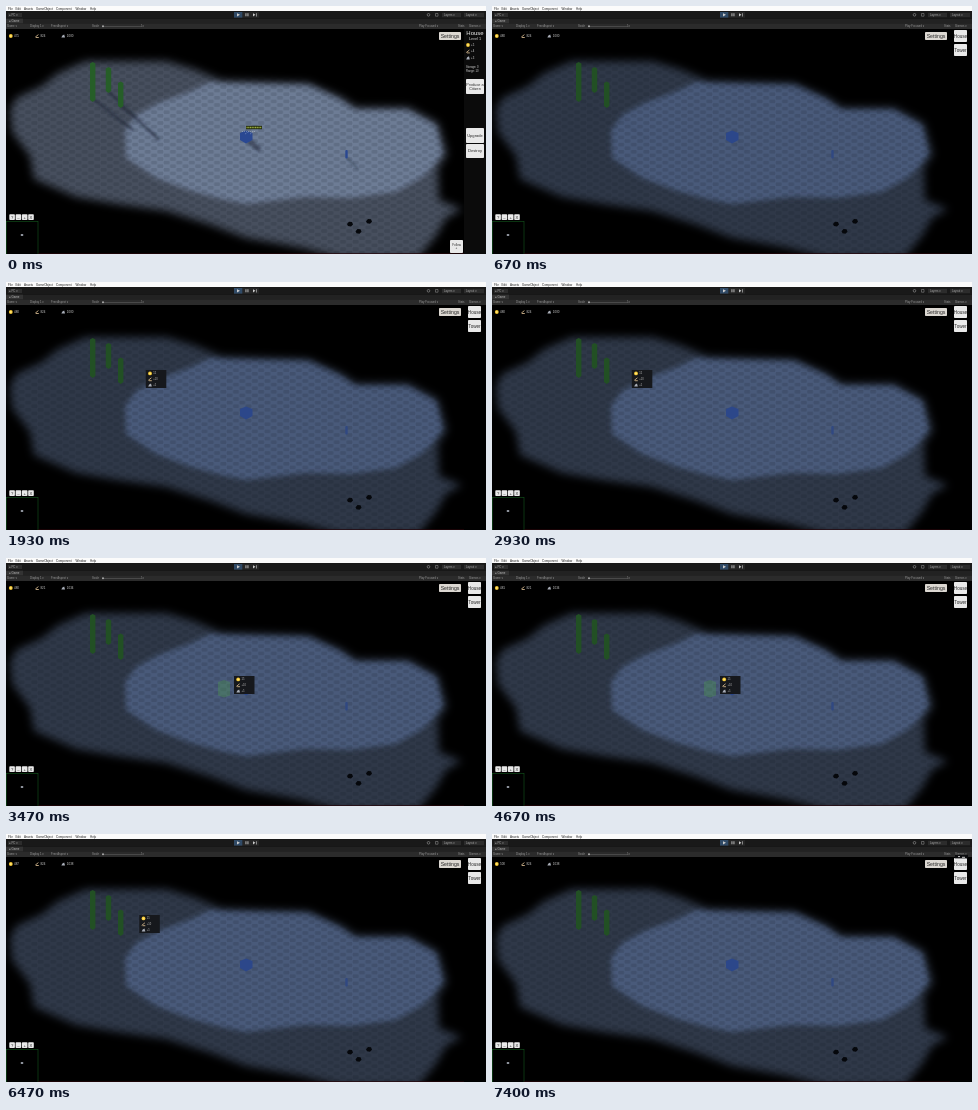
Recreate the animation shown at these times as an HTML page. Size 480x248 px, loop 7540 ms.

```html
<!DOCTYPE html>
<html lang="en">
<head>
<meta charset="utf-8">
<title>Strategy game</title>
<style>
  html, body { margin: 0; width: 100%; height: 100%; overflow: hidden; background: #000; }
  svg { display: block; width: 100vw; height: 100vh; font-family: "Liberation Sans", Arial, sans-serif; }
</style>
</head>
<body>
<svg id="stage" viewBox="0 0 480 248">
  <defs>
    <pattern id="tiles" width="12.6" height="7.2" patternUnits="userSpaceOnUse">
      <path d="M.6 0H5.7L6.3 1.8L5.7 3.6H.6L0 1.8ZM6.9 3.6H12L12.6 5.4L12 7.2H6.9L6.3 5.4Z" fill="#0a1018" opacity=".13"/>
    </pattern>
    <filter id="fog" x="-10%" y="-10%" width="120%" height="120%"><feGaussianBlur stdDeviation="4"/></filter>
    <filter id="edge"><feGaussianBlur stdDeviation="2.4"/></filter>
    <filter id="soft" x="-50%" y="-50%" width="200%" height="200%"><feGaussianBlur stdDeviation=".8"/></filter>
    <mask id="seen" maskUnits="userSpaceOnUse" x="0" y="23" width="480" height="225">
      <path filter="url(#fog)" fill="#fff" d="M80 55H160L188 63L215 74L302 77L335 91L350 101H402L432 117L441 148L432 162L433 194L456 203L440 212L430 230L412 252H335L296 242L240 232L205 219L160 205L110 198L70 191L28 173L24 150L6 126L4 104L10 92L36 80L52 67Z"/>
    </mask>
  </defs>

  <rect width="480" height="248"/>
  <g mask="url(#seen)">
    <rect id="far" y="23" width="480" height="225"/>
    <path id="near" filter="url(#edge)" d="M119 124L130 109L152 97L185 85L206 75L255 76L305 76L335 91L350 102H402L432 118L438 148L428 160L415 172L390 186L345 192L300 191L240 198L215 193L185 185L150 172L120 152Z"/>
    <rect y="23" width="480" height="225" fill="url(#tiles)"/>
  </g>

  <g id="shadows" filter="url(#soft)" stroke="#1b2434" fill="none">
    <path d="M87 93L127 124M103 86L153 134M115 100L150 130" stroke-width="2.8"/>
    <path d="M242 134L254 144" stroke-width="5"/>
    <path d="M341 152L352 163" stroke-width="1.4"/>
  </g>
  <g id="pillars"></g>
  <path id="house" d="M234 127L240 124.5L246.5 127V134L240 137.5L234 134Z"/>
  <rect id="unit" x="339.3" y="144" width="2.4" height="8.5" rx="1"/>
  <g id="rocks" fill="#05070b"></g>
  <g id="label">
    <rect x="240" y="119.8" width="16" height="3.4" fill="#20280c"/>
    <path d="M240.5 121.5H255.5" stroke="#9cb040" stroke-width="1.3" stroke-dasharray="1.2 .5"/>
    <path d="M236 125.5H250M239 128L244 125M244 128L249 125" stroke="#c5cfdf" stroke-width=".4" stroke-dasharray="1 1"/>
  </g>

  <path id="ghost" d="M0 2L6 0L12 2V15.5L6 17.5L0 15.5Z" fill="#4c9254" opacity=".42"/>

  <g id="hud"></g>
  <g id="panel"></g>
  <g id="build"></g>
  <g id="tip"></g>
  <g id="editor"></g>
  <g id="pointer">
    <rect x="463" y="20.8" width="13" height="3.6" fill="#0b0c0e"/>
    <path d="M466 22.6H468M470 23.3H473" stroke="#ddd" stroke-width=".9"/>
  </g>
</svg>
<script>
const LOOP = 7540, STEP = 1000 / 15;
const $ = id => document.getElementById(id);
const clamp = v => Math.max(0, Math.min(1, v));
const span = (t, a, b) => clamp((t - a) / (b - a));
const ease = p => p * p * (3 - 2 * p);
const mix = (a, b, p) => `rgb(${a.map((v, i) => Math.round(v + (b[i] - v) * p))})`;
const show = (id, on) => $(id).setAttribute('visibility', on ? 'visible' : 'hidden');
const add = (id, html) => $(id).insertAdjacentHTML('beforeend', html);

const rect = (x, y, w, h, fill, extra = '') =>
  `<rect x="${x}" y="${y}" width="${w}" height="${h}" fill="${fill}" ${extra}/>`;
const text = (x, y, s, size = 3, fill = '#ddd', extra = '') =>
  `<text x="${x}" y="${y}" font-size="${size}" fill="${fill}" ${extra}>${s}</text>`;
const mid = 'text-anchor="middle"';
const button = (x, y, w, h, lines, size, fill = '#e9e9e9') =>
  rect(x, y, w, h, fill, 'rx=".8"') + lines.map((s, i) =>
    text(x + w / 2, y + h / 2 + size * (.35 + i - (lines.length - 1) / 2), s, size, '#282828', mid)).join('');

const coin = (x, y) => `<circle cx="${x}" cy="${y}" r="1.9" fill="#f3c52f"/><circle cx="${x}" cy="${y}" r="1" fill="#ffe57a"/>`;
const wood = (x, y) => `<path d="M${x - 1.8} ${y + 1.2}L${x + 1.4} ${y - 1.4}M${x - 1} ${y + 1.5}H${x + 1.8}" stroke="#b9a07c" stroke-width="1"/>`;
const stone = (x, y) => `<path d="M${x - 1.8} ${y + 1.6}L${x - .8} ${y - .5}L${x + 1} ${y - 1.5}L${x + 1.8} ${y + 1.6}Z" fill="#a9aeb8"/>`;
const icons = [coin, wood, stone];

function buildEditor() {
  let s = rect(0, 0, 480, 5, '#fbfbfb') + rect(0, 5, 480, 7.5, '#191919') +
    rect(0, 12.5, 480, 5, '#222') + rect(0, 17.3, 480, 5.7, '#2b2b2b') + rect(0, 12.7, 17, 4.6, '#333');
  [[2, 'File'], [9.5, 'Edit'], [18, 'Assets'], [30, 'GameObject'], [50, 'Component'], [69.5, 'Window'], [84, 'Help']]
    .forEach(([x, w]) => s += text(x, 3.6, w, 3, '#222'));
  s += rect(2, 7, 14, 4, '#2c2c2c') + text(3, 10, '&#9679; PC &#9662;', 2.8, '#aaa');
  s += rect(228, 6, 25, 5.6, '#262626') + rect(228, 6, 8.3, 5.6, '#304a66');
  s += '<path d="M231 7.2L234 8.8L231 10.4ZM239.5 7.3H240.4V10.3H239.5ZM241.5 7.3H242.4V10.3H241.5ZM247 7.2L249.4 8.8L247 10.4ZM250 7.2H250.6V10.4H250Z" fill="#ccc"/>';
  s += '<circle cx="422.5" cy="8.8" r="1.3" fill="none" stroke="#999" stroke-width=".6"/><path d="M429.5 7.5H432V10.2H429.5Z" fill="none" stroke="#999" stroke-width=".5"/>';
  s += rect(436, 6.8, 19, 4.4, '#2c2c2c') + text(438, 10, 'Layers &#9662;', 2.8, '#aaa');
  s += rect(458, 6.8, 20, 4.4, '#2c2c2c') + text(460, 10, 'Layout &#9662;', 2.8, '#aaa');
  s += text(3, 16.2, '&#9679; Game', 2.9, '#bbb');
  [[1, 'Game &#9662;'], [24, 'Display 1 &#9662;'], [45, 'Free Aspect &#9662;'], [86, 'Scale'], [413, 'Play Focused &#9662;'], [452, 'Stats'], [463, 'Gizmos &#9662;']]
    .forEach(([x, w]) => s += text(x, 21.2, w, 2.8, '#999'));
  s += rect(96, 20, 39, .5, '#666') + '<circle cx="97" cy="20.2" r="1" fill="#aaa"/>' + text(135, 21.2, '1x', 2.6, '#999');
  add('editor', s);
}

function buildHud() {
  let s = '';
  icons.forEach((icon, i) => s += icon(4.8 + 26.2 * i, 30));
  ['gold', 'logs', 'ore'].forEach((id, i) => s += text(8 + 26.4 * i, 31, '', 3, '#ccc', `id="${id}"`));
  s += button(433, 26, 22, 8, ['Settings'], 5.2, '#dcd8d2');
  s += rect(.4, 215.4, 31.6, 33, '#000', 'stroke="#12551c" stroke-width=".6"');
  s += rect(14.8, 228, 2.4, 2, '#8d929c') + rect(32, 247.3, 426, .7, '#26050a');
  ['?', '&#8211;', '+', 'X'].forEach((c, i) => s += button(3.3 + 6.3 * i, 208.2, 5.6, 5.8, [c], 4.2));
  add('hud', s);
}

function buildPanels() {
  let s = rect(458, 23, 22, 225, '#0b0b0b');
  s += text(469, 29, 'House', 6, '#f2f2f2', mid) + text(469, 33.7, 'Level 1', 3.8, '#ddd', mid);
  icons.forEach((icon, i) => s += icon(462, 39 + 6.4 * i) + text(465, 40 + 6.4 * i, '+' + [5, 4, 3][i], 2.8));
  s += text(460, 62.2, 'Storage: 0', 2.7) + text(460, 66.2, 'Range: 10', 2.7);
  s += button(460, 73, 18, 15, ['Produce a', 'Citizen'], 3.8);
  s += button(460, 122, 18, 15, ['Upgrade'], 4.1) + button(460, 138, 18, 14, ['Destroy'], 4.1);
  s += button(444, 234, 13, 13, ['Follow', '+'], 3);
  add('panel', s);
  add('build', button(462, 24, 13, 12, ['House'], 4.6) + button(462, 38, 13, 12, ['Tower'], 4.6));
  s = rect(0, 0, 20.5, 18, '#16181c');
  icons.forEach((icon, i) => s += icon(4.2, 3.4 + 5.8 * i) + text(7.5, 4.3 + 5.8 * i, ['15', '+10', '+5'][i], 2.6, '#bbb'));
  add('tip', s);
}

function buildScene() {
  [[84, 56, 40], [99.8, 61, 26], [112, 75.5, 26.5]].forEach(([x, y, h]) =>
    add('pillars', `<path d="M${x} ${y + 1.5}L${x + 2.7} ${y}L${x + 5.4} ${y + 1.5}V${y + h - 2}L${x + 2.7} ${y + h}L${x} ${y + h - 2}Z"/>`));
  [[344, 218], [363, 215.3], [352.5, 225.3]].forEach(([x, y]) =>
    add('rocks', `<path d="M${x - 3} ${y}L${x - 1} ${y - 2.3}L${x + 2} ${y - 2}L${x + 3} ${y + .5}L${x + 1} ${y + 2.4}L${x - 2} ${y + 2}Z"/>`));
}

// time, x, y of the cost tip
const path = [
  [866, 446, 32], [1333, 222, 76], [1600, 139.8, 88], [2930, 139.8, 88], [3466, 228, 118],
  [4666, 228, 118], [5066, 133.3, 81], [6466, 133.3, 81], [7133, 474, 14]
];
function tipAt(t) {
  let i = 0;
  while (i < path.length - 2 && t >= path[i + 1][0]) i++;
  const [a, x, y] = path[i], [b, u, v] = path[i + 1];
  const p = ease(span(t, a, b));
  return [x + (u - x) * p, y + (v - y) * p];
}

// last value whose time has come
const pick = (t, list) => list.filter(([at]) => t >= at).pop()[1];

function draw(now) {
  const t = Math.floor((now % LOOP + 5) / STEP) * STEP;
  const dusk = span(t, 0, 530);
  $('far').setAttribute('fill', mix([71, 79, 94], [47, 56, 72], dusk));
  $('near').setAttribute('fill', mix([109, 123, 149], [72, 90, 122], dusk));
  $('pillars').setAttribute('fill', mix([38, 94, 40], [34, 80, 36], dusk));
  $('house').setAttribute('fill', mix([42, 72, 146], [44, 71, 138], dusk));
  $('unit').setAttribute('fill', mix([42, 72, 146], [48, 72, 130], dusk));
  $('shadows').setAttribute('opacity', .5 * (1 - span(t, 0, 730)));

  const selected = t < 320;
  show('panel', selected);
  show('label', selected);
  show('build', !selected);

  const placing = t > 865 && t < 7130;
  const [x, y] = tipAt(t);
  $('tip').setAttribute('transform', `translate(${x} ${y})`);
  $('ghost').setAttribute('transform', `translate(${x - 16} ${y + 4})`);
  show('tip', placing);
  show('ghost', placing && x > 152 && x < 425);
  show('pointer', t > 7320);

  $('gold').textContent = pick(t, [[0, 475], [300, 480], [4060, 481], [6460, 487], [7060, 500]]);
  $('logs').textContent = pick(t, [[0, 824], [3200, 821], [6460, 824]]);
  $('ore').textContent = pick(t, [[0, 1000], [3200, 1034], [6460, 1038]]);
}

buildEditor();
buildHud();
buildPanels();
buildScene();
const start = performance.now();
(function tick() {
  draw(performance.now() - start);
  requestAnimationFrame(tick);
})();
</script>
</body>
</html>
```
